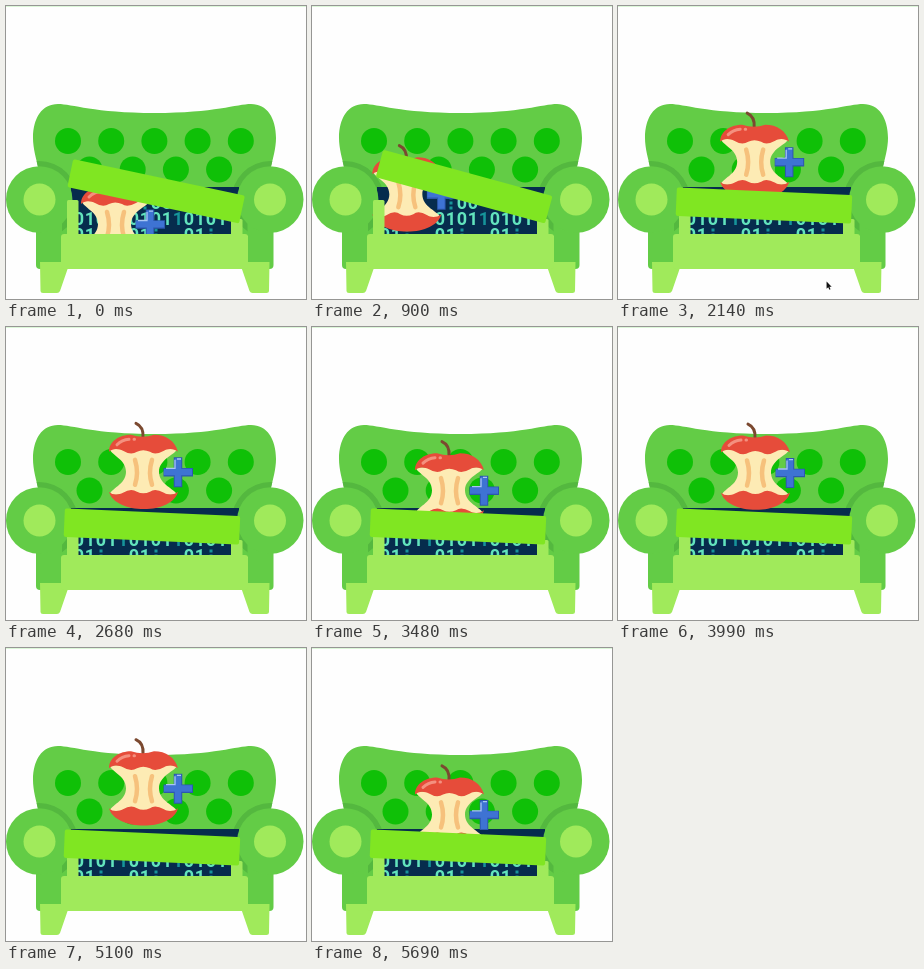
Recreate the animation shown at these times as an HTML page with a canvas. Size 300x293 px, loop 5710 ms.

```html
<!DOCTYPE html>
<html>
<head>
<meta charset="utf-8">
<style>
html, body { margin: 0; width: 100%; height: 100%; overflow: hidden; background: #fefefe; }
canvas { display: block; }
</style>
</head>
<body>
<canvas id="stage" width="300" height="293"></canvas>
<script>
const ctx = document.getElementById("stage").getContext("2d");
const LOOP = 5710, LANDING = 2069, BOUNCE = 362.4;
const GREEN = "#63cc46", DARK_GREEN = "#54b83f", LIME = "#a0ea5b", CUSHION = "#80e622";
const RED = "#e64c3a", FLESH = "#fdebb4";

// time, then values
const applePath = [[540, 109, 168], [1100, 79, 110], [1260, 51, 69], [1410, 35, 40],
  [1540, 49, 30], [1720, 92, 49], [1900, 124, 84], [LANDING, 136, 116.4]];
const lidPath = [[540, 12], [1100, 18.5], [1255, 23.5], [1410, 18.2], [1720, 7], [1900, 2.5]];

function follow(keys, t, k) {
  const last = keys.length - 1;
  if (t <= keys[0][0]) return keys[0][k];
  if (t >= keys[last][0]) return keys[last][k];
  let i = 0;
  while (t > keys[i + 1][0]) i++;
  const slope = j => j === 0 || j === last ? 0 :
    (keys[j + 1][k] - keys[j - 1][k]) / (keys[j + 1][0] - keys[j - 1][0]);
  const a = keys[i], b = keys[i + 1], span = b[0] - a[0];
  const u = (t - a[0]) / span, v = 1 - u;
  return a[k] * (1 + 2 * u) * v * v + b[k] * u * u * (3 - 2 * u) +
    span * (slope(i) * u * v * v - slope(i + 1) * u * u * v);
}

function fill(color, d) {
  ctx.fillStyle = color;
  ctx.fill(new Path2D(d));
}

function line(color, width, d) {
  ctx.strokeStyle = color;
  ctx.lineWidth = width;
  ctx.stroke(new Path2D(d));
}

function disc(color, x, y, r) {
  ctx.fillStyle = color;
  ctx.beginPath();
  ctx.arc(x, y, r, 0, Math.PI * 2);
  ctx.fill();
}

function box(color, x, y, w, h, r = 0) {
  ctx.fillStyle = color;
  ctx.beginPath();
  ctx.roundRect(x, y, w, h, r);
  ctx.fill();
}

function mirrored(draw) {
  draw();
  ctx.save();
  ctx.translate(297.5, 0);
  ctx.scale(-1, 1);
  draw();
  ctx.restore();
}

function back() {
  const shape = "M27 132C27 112 36 98 52 98C66 98 88 107 148.5 107S231 98 245 98C261 98 270 112 270 132C270 142 267 152 264 165V230H33V165C30 152 27 142 27 132Z";
  fill(GREEN, shape);
  for (let i = 0; i < 5; i++) disc("#0fc007", 62 + 43.2 * i, 135, 13);
  for (let i = 0; i < 4; i++) disc("#0fc007", 83.5 + 43.2 * i, 163.5, 13);
  ctx.save();
  ctx.clip(new Path2D(shape));
  mirrored(() => disc(DARK_GREEN, 33, 194, 39));
  ctx.restore();
}

function digits() {
  const rows = [[197, " :00 "], [213, "01011"], [229, "01:  "]];
  ctx.save();
  ctx.beginPath();
  ctx.rect(65, 181, 168, 48);
  ctx.clip();
  box("#062c4d", 65, 181, 168, 48);
  ctx.font = "bold 18px Roboto, Arial, sans-serif";
  ctx.textAlign = "center";
  ctx.textBaseline = "alphabetic";
  for (const [y, text] of rows) {
    for (let i = 0; i < 14; i++) {
      const c = text[i % 5], x = 73 + 11 * i;
      const dim = c === ":" || (c === "1" && i % 5 === 4);
      ctx.fillStyle = dim ? "#16949a" : "#62e4bd";
      if (c === ":") {
        for (let n = -1; n < 2; n++) ctx.fillRect(x - 1.5, y + n * 5 - 1.5, 3, 3);
      } else ctx.fillText(c, x, y + 6);
    }
  }
  ctx.restore();
}

function arms() {
  mirrored(() => {
    box(GREEN, 30, 200, 26, 63, 4);
    disc(GREEN, 33.2, 193.5, 33.2);
    disc(LIME, 33.5, 193.5, 16);
  });
}

function base() {
  box(LIME, 61, 194, 11.5, 36, 1.5);
  box(LIME, 225, 213, 11.5, 17, 1.5);
  mirrored(() => fill(LIME, "M34 256H64L54 285Q53 287 51 287H37Q34.5 287 34.5 285Z"));
  box(LIME, 55, 228, 187, 35, 3);
}

function apple(x, y) {
  ctx.save();
  ctx.translate(x, y);
  ctx.lineCap = "round";
  line("#7b4930", 3, "M-7 1.5Q1 5 0 16");
  fill(FLESH, "M-33 27H34C34 32 16 37 16 50S32 67 34 73H-33C-33 67 -17 63 -17 50S-33 33 -33 27Z");
  line("#f6c17c", 4.5, "M-8 38Q-4 51 -8 63M9 38Q5 51 9 63");
  fill(RED, "M-34 30C-34 19 -23 13 -12 13Q0 17 11 13C23 13 32 19 35 30C30 26 24 27 21 29Q12 34 7 30Q0 27 -6 30Q-12 34 -20 29C-24 27 -30 26 -34 30Z");
  fill(RED, "M-34 70C-30 74 -24 73 -20 71Q-12 66 -6 70Q0 73 7 70Q12 66 21 71C24 73 30 74 35 70C32 81 18 87.3 1 87.3S-31 81 -34 70Z");
  line("#f4907f", 3, "M-26 23Q-21 18 -14 17.5M-9 17.5H-8.5");
  plus();
  ctx.restore();
}

function plus() {
  ctx.lineCap = "butt";
  line("#2c57ad", 8.5, "M20.5 50.5H50M35 35.5V65.5");
  line("#3e73d3", 6.5, "M21 50.2H49M35 36.5V64.5");
  line("#a9c6f4", 1.3, "M32 38V46.5H23M34 37.2H38");
}

function lid(angle) {
  ctx.save();
  ctx.translate(233, 217.5);
  ctx.rotate(angle * Math.PI / 180);
  box(CUSHION, -175.5, -28.5, 175.5, 28.5, 2);
  ctx.restore();
}

function pointer(t) {
  if (t < 1990 || t > 2460) return;
  const u = (t - 1990) / 470;
  ctx.save();
  ctx.translate(206 + 8 * u, 293 - 80 * u * (1 - u));
  ctx.scale(0.75, 0.75);
  const d = "M0 0V9.5L2.2 7.5L3.8 11L5.3 10.3L3.8 7H6.8Z";
  line("#fff", 1.4, d);
  fill("#111", d);
  ctx.restore();
}

function draw(t) {
  box("#fefefe", 0, 0, 300, 293);
  box("#dcf7d8", 0, 0, 300, 1);
  back();
  digits();
  arms();
  const since = t - LANDING;
  if (since < 0) apple(follow(applePath, t, 1), follow(applePath, t, 2));
  else apple(136 + Math.min(1, since / 400), 100.7 + 15.7 * Math.cos(since / BOUNCE * Math.PI * 2));
  base();
  lid(follow(lidPath, t, 1));
  pointer(t);
}

const start = performance.now();
function tick() {
  draw((performance.now() - start) % LOOP);
  requestAnimationFrame(tick);
}
tick();
</script>
</body>
</html>
```
